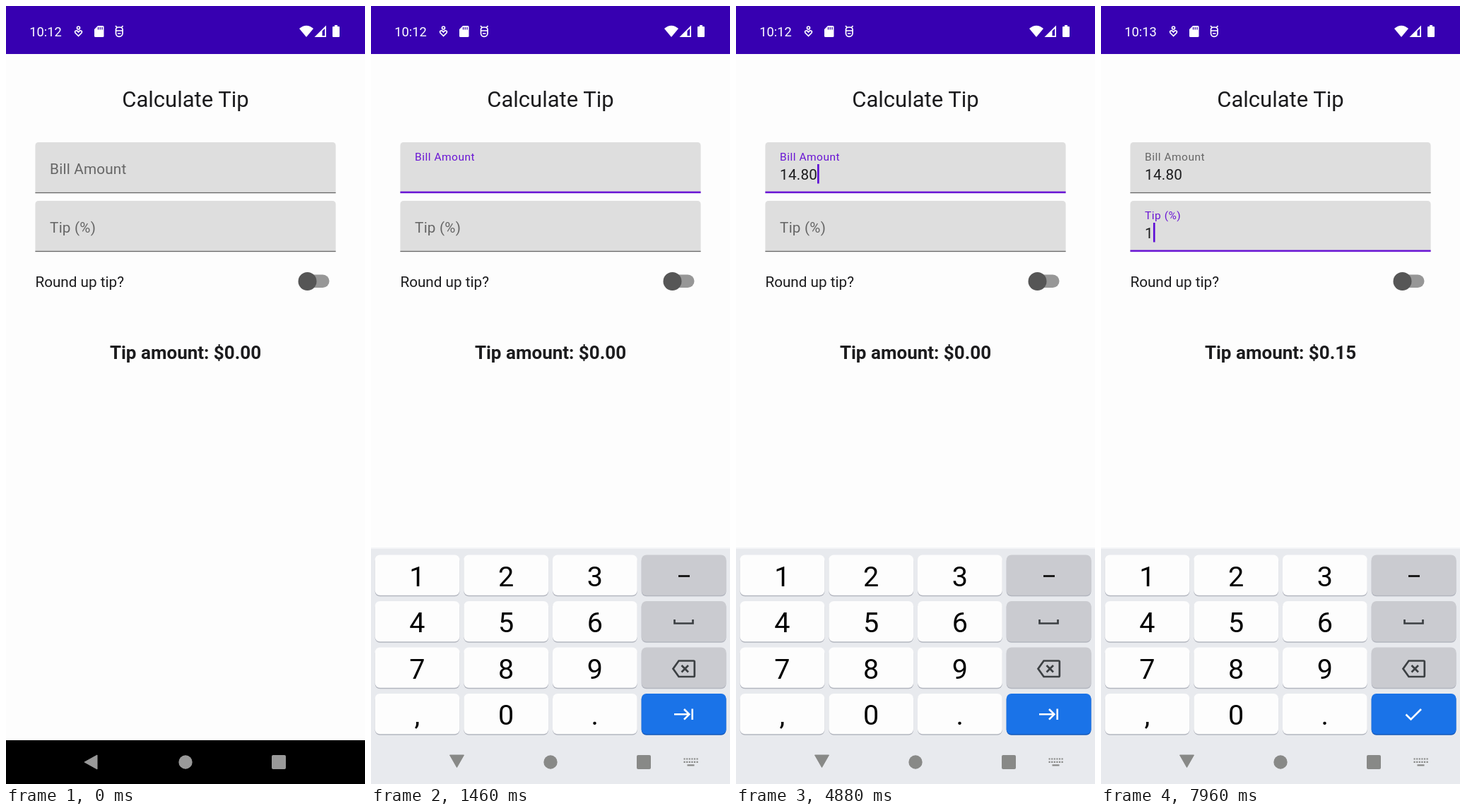
Write an HTML page that moves like this. It is 508x1102 px and loops after 8000 ms.

```html
<!DOCTYPE html>
<html lang="en">
<head>
<meta charset="utf-8">
<title>Calculate Tip</title>
<style>
  html, body { margin: 0; width: 100%; height: 100%; overflow: hidden; background: #fdfdfd; }
  svg { display: block; width: 100vw; height: 100vh; font-family: Roboto, sans-serif; }
  .mid { text-anchor: middle; }
  .body { font-size: 20.7px; fill: #1c1c1e; }
  .spaced { letter-spacing: .2px; }
  .line { fill: none; stroke-linecap: butt; stroke-linejoin: miter; }
</style>
</head>
<body>
<svg viewBox="0 0 508 1102">
  <rect width="508" height="1102" fill="#fdfdfd"/>
  <rect width="508" height="68" fill="#3700b1"/>

  <g id="status" fill="#fff">
    <text id="clock" x="33.3" y="43" font-size="18.3"></text>
    <g class="line" stroke="#fff" stroke-width="1.7">
      <circle cx="102.5" cy="31" r="2"/>
      <path d="M102.5 42.5L98 38Q96.800 35.500 99 35Q101 34.700 102.500 37Q104 34.700 106 35Q108.200 35.500 107 38Z"/>
      <path d="M155.500 35V39Q156 43.300 160 43.300Q164.500 43.300 165 39V35ZM155.500 35V33Q156 30 160 30Q164.500 30 165 33V35M155 28L157.500 31M165.500 28L163 31M158 39H162.500"/>
    </g>
    <path d="M130 28H137Q138.500 28 138.500 29.500V42.500Q138.500 44 137 44H126.500Q125 44 125 42.500V33Z"/>
    <path d="M130.500 30V33.500M133.200 30V33.500M136 30V33.500" stroke="#3700b1" stroke-width="1.300"/>
    <path d="M415 32Q425 23.500 435 32L425 44Z"/>
    <path d="M436.500 44L453 27.500V44Z"/>
    <path d="M447.500 35.500L451.200 32V42.300H447.500Z" fill="#3700b1"/>
    <path d="M465 27H469V29H471Q472 29 472 30V43Q472 44 471 44H463Q462 44 462 43V30Q462 29 463 29H465Z"/>
  </g>

  <text class="mid" x="254" y="143" font-size="31" fill="#1c1c1e">Calculate Tip</text>
  <g id="fields"></g>
  <text class="body" x="41.400" y="398">Round up tip?</text>
  <rect x="416" y="380.500" width="41.500" height="18.500" rx="9.250" fill="#979797"/>
  <circle cx="426.500" cy="390" r="13" fill="#565656"/>
  <text id="total" class="mid" x="254" y="500" font-size="26" font-weight="700" fill="#1c1c1e"></text>

  <rect y="1040" width="508" height="62" fill="#000"/>
  <g fill="#999">
    <path d="M111 1071L129 1061V1081Z" stroke="#999" stroke-linejoin="round"/>
    <circle cx="254" cy="1071" r="9.700"/>
    <rect x="376" y="1061" width="20" height="20" rx="2"/>
  </g>

  <g id="keyboard">
    <rect y="767" width="508" height="2" fill="#f3f4f6"/>
    <rect y="769" width="508" height="340" fill="#e8eaee"/>
    <g id="keys"></g>
    <g class="line" stroke="#3c4043" stroke-width="2.700">
      <path d="M435 807.500H451" stroke="#111" stroke-width="2.800"/>
      <path d="M429.500 869V874.500H455.500V869"/>
      <path d="M435.500 927.500H456.500Q457.800 927.500 457.800 929V948.500Q457.800 950 456.500 950H435.500L427.500 938.700Z"/>
      <path d="M439.500 934L449 943.500M449 934L439.500 943.500"/>
    </g>
    <g class="line" stroke="#fff" stroke-width="2.600">
      <path id="next" d="M429 1003.300H450M443 996L450.300 1003.300L443 1010.600M454.700 995.500V1011"/>
      <path id="done" d="M431.500 1003.500L438.500 1010.500L453 996"/>
    </g>
  </g>
  <g id="nav" fill="#888987">
    <path d="M111.500 1061H131.500L121.500 1078.500Z" stroke="#888987" stroke-linejoin="round"/>
    <circle cx="254" cy="1071" r="9.700"/>
    <rect x="376" y="1061" width="20" height="20" rx="2"/>
    <path class="line" d="M442.500 1066.500H463M442.500 1070.800H463" stroke="#888987" stroke-width="2.200" stroke-dasharray="2.200 1.400"/>
    <path d="M447.500 1074.300H457.500V1076.500H447.500Z"/>
  </g>
</svg>
<script>
const LOOP = 8000;
const BILL_FOCUS = 530, TIP_FOCUS = 5600, SLIDE = 742, MINUTE = 7000;
const PURPLE = [106, 22, 212], GREY = [102, 102, 102];
const billEdits = [[1900, "1"], [2350, "14"], [2800, "14."], [3400, "14.8"], [4500, "14.80"]];
const tipEdits = [[7600, "1"]];

const $ = id => document.getElementById(id);
const ramp = (t, start, length) => Math.min(1, Math.max(0, (t - start) / length));
const smooth = x => x * x * (3 - 2 * x);
const mix = (a, b, k) => a + (b - a) * k;

function add(parent, tag, attrs, text = "") {
  const el = document.createElementNS("http://www.w3.org/2000/svg", tag);
  set(el, attrs);
  el.textContent = text;
  return parent.appendChild(el);
}

function set(el, attrs) {
  for (const name in attrs) el.setAttribute(name, attrs[name]);
}

function makeField(y, label) {
  const g = add($("fields"), "g", { transform: `translate(0 ${y})` });
  add(g, "path", { d: "M41.400 72V5Q41.400 0 46.400 0H461.600Q466.600 0 466.600 5V72Z", fill: "#dedede" });
  return {
    line: add(g, "rect", { x: 41.4, width: 425.2 }),
    label: add(g, "text", { x: 62.1 }, label),
    value: add(g, "text", { x: 62.1, y: 53, class: "body spaced" }),
    cursor: add(g, "rect", { y: 31, width: 2.6, height: 27.5, fill: "#5b0bd6" })
  };
}

function drawField(field, t, edits, focus, blur) {
  const lift = smooth(ramp(t, focus, 150));
  const active = lift * (1 - ramp(t, blur, 150));
  const color = `rgb(${GREY.map((c, i) => mix(c, PURPLE[i], active))})`;
  const thick = mix(1.3, 2.6, active);
  const edit = edits.filter(e => e[0] <= t).pop() || [focus, ""];

  set(field.line, { y: 72.2 - thick, height: thick, fill: color });
  set(field.label, {
    y: mix(44.7, 25.7, lift), fill: color,
    "font-size": mix(20.7, 15.5, lift), "letter-spacing": mix(0.2, 0.5, lift)
  });
  field.value.textContent = edit[1];
  const on = t >= focus && t < blur && (t - edit[0]) % 1000 < 500;
  set(field.cursor, { x: 62.1 + (edit[1] ? field.value.getComputedTextLength() : 0), opacity: on ? 1 : 0 });
}

function makeKeys() {
  const labels = ["123", "456", "789", ",0."];
  for (let row = 0; row < 4; row++) {
    for (let col = 0; col < 4; col++) {
      const x = 5.6 + col * 125.7, y = 777.5 + row * 65.5;
      const side = col === 3, enter = side && row === 3;
      const box = { x, width: 119.8, height: 57.3, rx: 7 };
      add($("keys"), "rect", { ...box, y: y + 1.5, fill: enter ? "#1558b8" : "#b3b6bf" });
      add($("keys"), "rect", { ...box, y, fill: enter ? "#1a73e8" : side ? "#cacbd0" : "#fdfdfd" });
      if (!side) add($("keys"), "text", { x: x + 59.8, y: y + 44.3, class: "mid", "font-size": 39.5 }, labels[row][col]);
    }
  }
}

makeKeys();
const bill = makeField(193, "Bill Amount");
const tip = makeField(276, "Tip (%)");

function draw(now) {
  const t = now % LOOP;
  drawField(bill, t, billEdits, BILL_FOCUS, TIP_FOCUS);
  drawField(tip, t, tipEdits, TIP_FOCUS, LOOP);

  const shown = 1 - (1 - ramp(t, SLIDE, 200)) ** 2;
  set($("keyboard"), { opacity: shown, transform: `translate(0 ${334 * (1 - shown)})` });
  set($("nav"), { opacity: ramp(shown, 0.65, 0.35) });
  set($("next"), { opacity: t < TIP_FOCUS ? 1 : 0 });
  set($("done"), { opacity: t < TIP_FOCUS ? 0 : 1 });

  $("clock").textContent = t < MINUTE ? "10:12" : "10:13";
  const amount = Math.round(bill.value.textContent * tip.value.textContent) / 100;
  $("total").textContent = `Tip amount: $${amount.toFixed(2)}`;
  requestAnimationFrame(draw);
}
requestAnimationFrame(draw);
</script>
</body>
</html>
```
